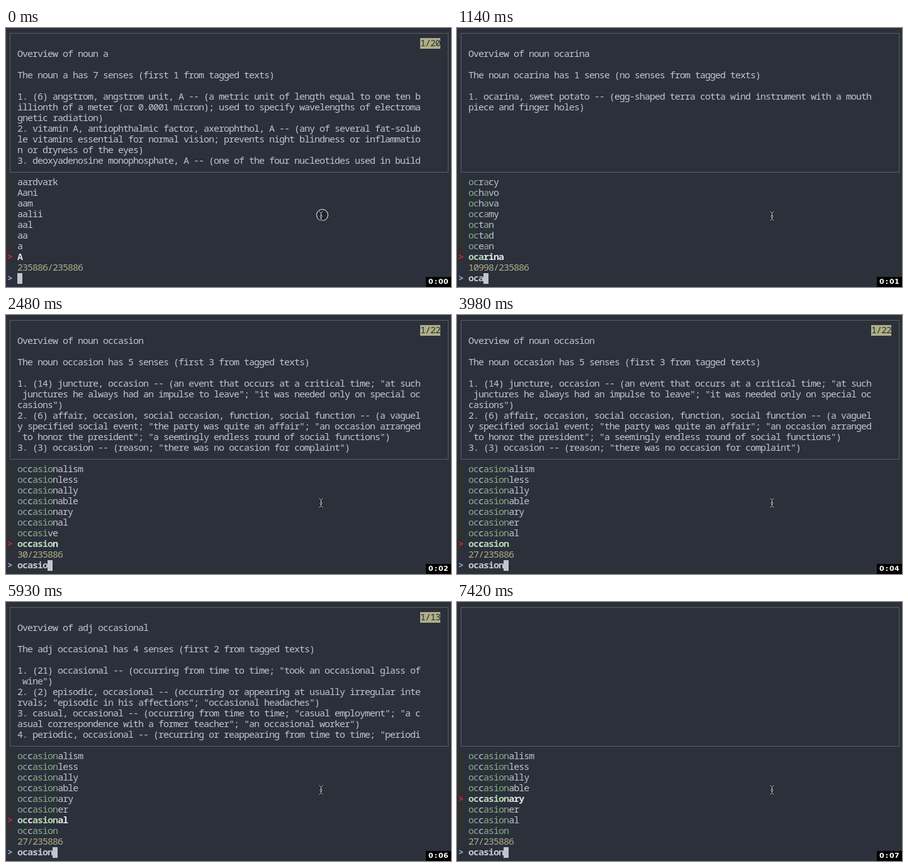
An HTML page for the animation above (8 s loop, 707x412 px).

```html
<!DOCTYPE html>
<html lang="en">
<head>
<meta charset="utf-8">
<title>Fuzzy word finder</title>
<style>
  html, body { margin: 0; width: 100%; height: 100%; overflow: hidden; background: #2b303b; }
  #stage { position: relative; width: 707px; height: 412px; overflow: hidden; color: #c0c5ce;
    font: 15px/17px "Noto Sans Mono", monospace; letter-spacing: -1px; font-variant-ligatures: none; }
  #stage > * { position: absolute; }
  #frame { left: 6px; top: 8px; width: 695px; height: 220px; border: 1px solid #5f5f5f; }
  pre { margin: 0; font: inherit; white-space: pre; }
  #preview { left: 18px; top: 32px; }
  #badge { left: 658px; top: 16px; height: 17px; line-height: 15px; background: #afaf87; color: #2b303b; }
  #gutter { left: 2px; top: 237px; width: 8px; height: 136px; background: #303030; }
  #list { left: 18px; top: 236px; }
  #list i { font-style: normal; color: #87af87; }
  #list b { color: #e4e4e4; }
  #list b i { color: #afd7af; }
  #pointer { left: 2px; color: #dc1f4a; font-weight: bold; }
  #count { left: 18px; top: 372px; color: #afaf87; }
  #prompt { left: 2px; top: 389px; color: #87afd7; font-weight: bold; }
  #query { left: 18px; top: 389px; font-weight: bold; }
  #cursor { top: 390px; width: 8px; height: 17px; background: #c0c5ce; }
  #clock { left: 667px; top: 396px; width: 36px; height: 16px; padding-left: 4px; background: #000; color: #fff;
    font: bold 11px/15px "DejaVu Sans", sans-serif; letter-spacing: .35px; white-space: nowrap; }
  #clock i { display: inline-block; width: 8px; text-align: center; font-style: normal; }
  svg { left: 0; top: 0; }
</style>
</head>
<body>
<div id="stage">
  <div id="frame"></div>
  <pre id="preview"></pre>
  <div id="badge"></div>
  <div id="gutter"></div>
  <pre id="list"></pre>
  <div id="pointer">&gt;</div>
  <div id="count"></div>
  <div id="prompt">&gt;</div>
  <div id="query"></div>
  <div id="cursor"></div>
  <svg width="707" height="412" fill="none">
    <defs>
      <path id="beam" d="M497.5 291.5l3 3 3-3M497.5 306.5l3-3 3 3M500.5 294.5v2q-3 3 0 6v1M500.5 296.5q3 3 0 6"/>
    </defs>
    <circle id="click" cx="502.5" cy="297.5" r="9" fill="#22252d" stroke="#fff"/>
    <use href="#beam" stroke="#181a20" stroke-width="2.6"/>
    <use href="#beam" stroke="#e8e8e8"/>
  </svg>
  <div id="clock"></div>
</div>
<script>
const LOOP = 8000, COLUMNS = 80, ROWS = 11, ROW_HEIGHT = 17, CELL = 8;
const el = id => document.getElementById(id);

const overview = (kind, word, senses, ...items) =>
  [`Overview of ${kind} ${word}`, "", `The ${kind} ${word} has ${senses} from tagged texts)`, "", ...items];

const angstrom = overview("noun", "a", "7 senses (first 1",
  "1. (6) angstrom, angstrom unit, A -- (a metric unit of length equal to one ten billionth of a meter (or 0.0001 micron); used to specify wavelengths of electromagnetic radiation)",
  "2. vitamin A, antiophthalmic factor, axerophthol, A -- (any of several fat-soluble vitamins essential for normal vision; prevents night blindness or inflammation or dryness of the eyes)",
  "3. deoxyadenosine monophosphate, A -- (one of the four nucleotides used in build");
const oxygen = overview("noun", "o", "3 senses (first 1",
  "1. (3) oxygen, O, atomic number 8 -- (a nonmetallic bivalent element that is normally a colorless odorless tasteless nonflammable diatomic gas; constitutes 21 percent of the atmosphere by volume; the most abundant element in the earth's crust)",
  "2. O, o -- (the 15th letter of the Roman alphabet)",
  '3. O, type O, group O -- (the blood group whose red cells carry neither the A nor B antigens; "people with type O blood are universal donors")');
const ocarina = overview("noun", "ocarina", "1 sense (no senses",
  "1. ocarina, sweet potato -- (egg-shaped terra cotta wind instrument with a mouthpiece and finger holes)");
const occasion = overview("noun", "occasion", "5 senses (first 3",
  '1. (14) juncture, occasion -- (an event that occurs at a critical time; "at such junctures he always had an impulse to leave"; "it was needed only on special occasions")',
  '2. (6) affair, occasion, social occasion, function, social function -- (a vaguely specified social event; "the party was quite an affair"; "an occasion arranged to honor the president"; "a seemingly endless round of social functions")',
  '3. (3) occasion -- (reason; "there was no occasion for complaint")');
const occasional = overview("adj", "occasional", "4 senses (first 2",
  '1. (21) occasional -- (occurring from time to time; "took an occasional glass of wine")',
  '2. (2) episodic, occasional -- (occurring or appearing at usually irregular intervals; "episodic in his affections"; "occasional headaches")',
  '3. casual, occasional -- (occurring from time to time; "casual employment"; "a casual correspondence with a former teacher"; "an occasional worker")',
  '4. periodic, occasional -- (recurring or reappearing from time to time; "periodi');

const partial = "occasionalism occasionless occasionally occasionable occasionary occasional occasive occasion";
const full = "occasionalism occasionless occasionally occasionable occasionary occasioner occasional occasion";

// start time, query, matches, words, selected row, preview, pages
const states = [
  [0, "", 235886, "aardvark Aani aam aalii aal aa a A", 7, angstrom, 20],
  [600, "o", 123386, "oh Og of oe od Od o O", 7, oxygen],
  [890, "oc", 41297, "octad ocrea ocque ochro ocher ocean ock och", 7, []],
  [1140, "oca", 10998, "ocracy ochavo ochava occamy octan octad ocean ocarina", 7, ocarina],
  [1590, "ocasi", 153, "occasionless occasionally occasionable occasionary occasioner occasional occasive occasion", 7, occasion, 22],
  [2480, "ocasio", 30, partial, 7, occasion, 22],
  [2630, "ocasio", 30, full, 7, occasion, 22],
  [2780, "ocasion", 27, full, 7, occasion, 22],
  [4430, "ocasion", 27, full, 6, occasional, 13],
  [6370, "ocasion", 27, full, 5, []],
  [7420, "ocasion", 27, full, 4, []],
];
const seconds = [990, 2040, 2930, 3980, 5030, 5930, 6970];

const wrap = lines => lines
  .flatMap(line => line.match(new RegExp(`.{1,${COLUMNS}}`, "g")) || [""])
  .slice(0, ROWS).join("\n");

function highlight(word, query) {
  let next = 0;
  return [...word].map(letter => {
    if (letter.toLowerCase() !== query[next]) return letter;
    next++;
    return `<i>${letter}</i>`;
  }).join("");
}

function show([, query, matches, words, selected, preview, pages]) {
  el("preview").textContent = wrap(preview);
  el("badge").textContent = pages ? `1/${pages}` : "";
  el("list").innerHTML = words.split(" ").map((word, row) => {
    const text = highlight(word, query);
    return row === selected ? `<b>${text}</b>` : text;
  }).join("\n");
  el("pointer").style.top = 236 + selected * ROW_HEIGHT + "px";
  el("count").textContent = `${matches}/235886`;
  el("query").textContent = query;
  el("cursor").style.left = 18 + query.length * CELL + "px";
}

let shown;
function draw() {
  const time = performance.now() % LOOP;
  const state = states.findLast(([start]) => start <= time);
  if (state !== shown) show(shown = state);
  el("click").style.display = time < 150 ? "" : "none";
  el("clock").innerHTML = "0<i>:</i>0" + seconds.filter(start => start <= time).length;
  requestAnimationFrame(draw);
}
draw();
</script>
</body>
</html>
```
